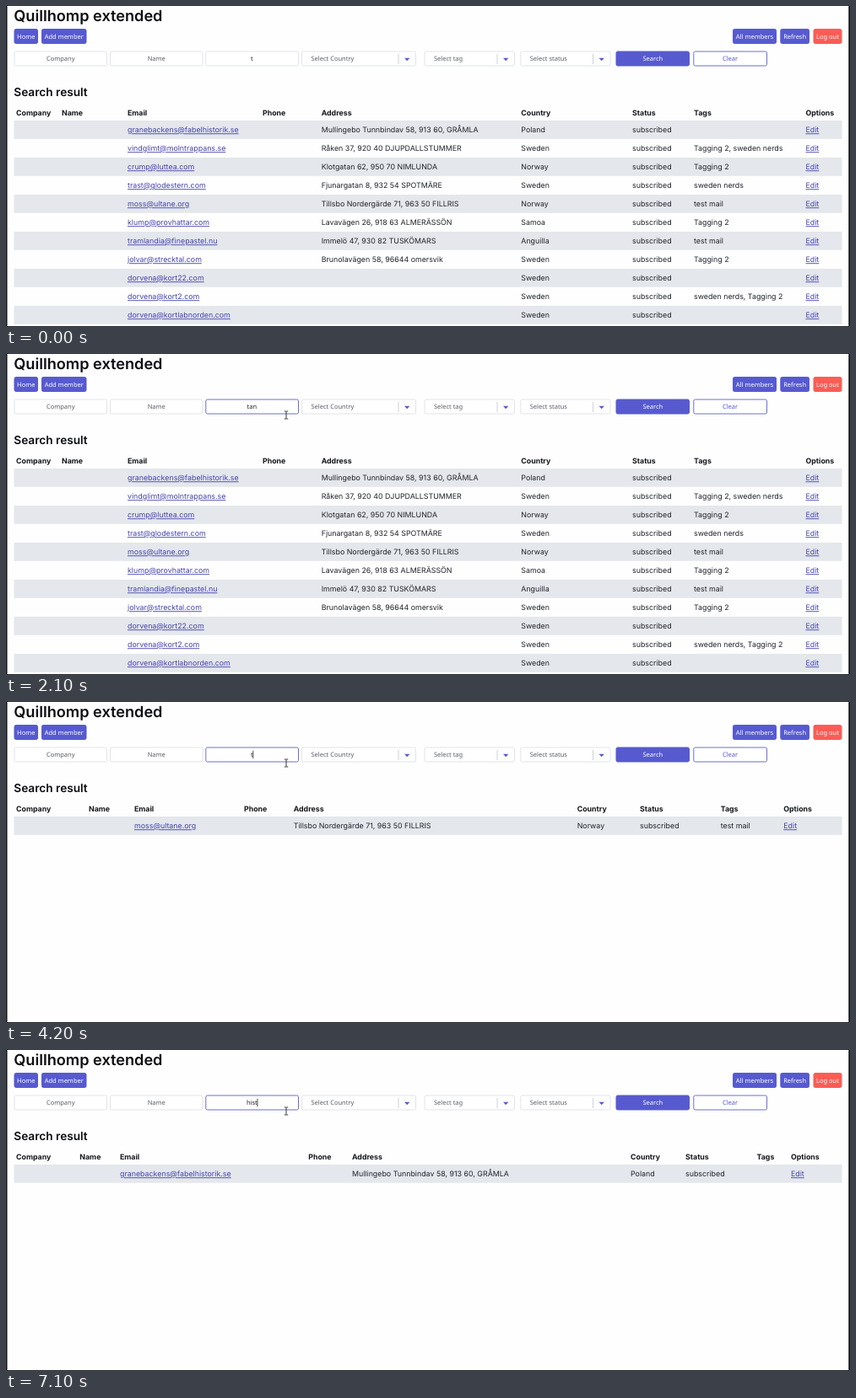
An HTML page that plays this animation: 1000 px wide and 380 px high, repeating every 7.2 s.

```html
<!DOCTYPE html>
<html lang="en">
<head>
<meta charset="utf-8">
<title>Member search</title>
<style>
  html, body { margin: 0; width: 100%; height: 100%; overflow: hidden; background: #fefefe; }
  svg { display: block; width: 100vw; height: 100vh; }
  text { font: 8.85px Inter, sans-serif; fill: #20232a; white-space: pre; text-rendering: geometricPrecision; }
  .title { font-size: 18.15px; font-weight: 600; fill: #0c0d12; }
  .sub { font-size: 13.65px; font-weight: 600; fill: #0c0d12; }
  .head { font-size: 8.8px; font-weight: 700; fill: #15171c; }
  .link { fill: #4240ad; text-decoration: underline; }
  .ui { font: 7.5px "Noto Sans", "Open Sans", sans-serif; fill: #585e69; }
  .mid { text-anchor: middle; }
  .white { fill: #fff; }
  .indigo { fill: #5457cd; }
  .dark { fill: #22252b; }
</style>
</head>
<body>
<svg id="stage" viewBox="0 0 1000 380" preserveAspectRatio="none"></svg>
<script>
const LOOP = 7200;
const INDIGO = '#575acf', EDGE = '#6c6ed5', RED = '#fb5c55', LINE = '#e2e4e9';
const stage = document.getElementById('stage');

function add(parent, tag, attrs, content) {
  const el = document.createElementNS('http://www.w3.org/2000/svg', tag);
  for (const key in attrs) el.setAttribute(key, attrs[key]);
  if (content !== undefined) el.textContent = content;
  parent.appendChild(el);
  return el;
}
const group = () => add(stage, 'g', {});
const label = (parent, x, y, str, cls = '') => add(parent, 'text', { x, y, class: cls }, str);
const show = (el, on) => el.setAttribute('visibility', on ? 'visible' : 'hidden');

function box(parent, x1, x2, y, fill, stroke) {
  return add(parent, 'rect', {
    x: x1 + 0.5, y: y + 0.5, width: x2 - x1 - 1, height: 17,
    rx: 1.8, fill, stroke, 'stroke-width': 1
  });
}
function button(parent, x1, x2, y, str, color = INDIGO) {
  box(parent, x1, x2, y, color, color);
  label(parent, (x1 + x2) / 2, y + 11.8, str, 'ui mid white');
}
function field(x1, x2, str) {
  const frame = box(stage, x1, x2, 53.5, '#fff', LINE);
  if (str) label(stage, (x1 + x2) / 2, 65.3, str, 'ui mid');
  return frame;
}
function select(x1, x2, str) {
  field(x1, x2);
  label(stage, x1 + 11.4, 65.3, str, 'ui');
  add(stage, 'rect', { x: x2 - 21.5, y: 57, width: 1, height: 12, fill: '#cfd2da' });
  add(stage, 'path', { d: `M${x2 - 14} 61.8h6.4l-3.2 3.5z`, fill: INDIGO });
}

// Page frame and controls
add(stage, 'rect', { width: 1000, height: 380, fill: '#fefefe' });
add(stage, 'rect', { width: 1.5, height: 380, fill: '#141418' });
add(stage, 'rect', { x: 998.3, width: 1.7, height: 380, fill: '#141418' });
label(stage, 9.3, 18, 'Quillhomp extended', 'title');
label(stage, 9.3, 107, 'Search result', 'sub');
button(stage, 9.5, 38, 27, 'Home');
button(stage, 42, 95.5, 27, 'Add member');
button(stage, 861, 913, 27, 'All members');
button(stage, 917.3, 952, 27, 'Refresh');
button(stage, 956.5, 990.5, 27, 'Log out', RED);
field(9.5, 120, 'Company');
field(123, 233.5, 'Name');
const input = field(236.3, 347);
select(350, 486, 'Select Country');
select(495.5, 603, 'Select tag');
select(609.3, 716.5, 'Select status');
button(stage, 722.5, 810, 53.5, 'Search');
const clear = group();
box(clear, 814.3, 902, 53.5, '#fff', EDGE);
label(clear, 858, 65.3, 'Clear', 'ui mid indigo');

// Email, address, country, tags
const people = [
  ['granebackens@fabelhistorik.se', 'Mullingebo Tunnbindav 58, 913 60, GRÅMLA', 'Poland', ''],
  ['vindglimt@molntrappans.se', 'Råken 37, 920 40 DJUPDALLSTUMMER', 'Sweden', 'Tagging 2, sweden nerds'],
  ['crump@luttea.com', 'Klotgatan 62, 950 70 NIMLUNDA', 'Norway', 'Tagging 2'],
  ['trast@glodestern.com', 'Fjunargatan 8, 932 54 SPOTMÄRE', 'Sweden', 'sweden nerds'],
  ['moss@ultane.org', 'Tillsbo Nordergärde 71, 963 50 FILLRIS', 'Norway', 'test mail'],
  ['klump@provhattar.com', 'Lavavägen 26, 918 63 ALMERÄSSÖN', 'Samoa', 'Tagging 2'],
  ['tramlandia@finepastel.nu', 'Immelö 47, 930 82 TUSKÖMARS', 'Anguilla', 'test mail'],
  ['jolvar@strecktal.com', 'Brunolavägen 58, 96644 omersvik', 'Sweden', 'Tagging 2'],
  ['dorvena@kort22.com', '', 'Sweden', ''],
  ['dorvena@kort2.com', '', 'Sweden', 'sweden nerds, Tagging 2'],
  ['dorvena@kortlabnorden.com', '', 'Sweden', '']
];
const heads = ['Company', 'Name', 'Email', 'Phone', 'Address', 'Country', 'Status', 'Tags', 'Options'];

function table(cols, rows) {
  const g = group();
  heads.forEach((h, i) => label(g, cols[i], 129.5, h, 'head'));
  rows.forEach(([email, address, country, tags], i) => {
    const top = 136 + i * 22, y = top + 14.3;
    if (i % 2 === 0) add(g, 'rect', { x: 9.5, y: top, width: 981, height: 21.8, fill: '#e4e7eb' });
    label(g, cols[2], y, email, 'link');
    label(g, cols[4], y, address);
    label(g, cols[5], y, country);
    label(g, cols[6], y, 'subscribed');
    label(g, cols[7], y, tags);
    label(g, cols[8], y, 'Edit', 'link');
  });
  return g;
}
const tables = {
  all: table([12, 66, 144, 304, 373.7, 610.3, 742, 815, 947.5], people),
  tan: table([12, 98, 152, 282, 340.7, 676.7, 751, 846.7, 921.3], [people[4]]),
  hist: table([12, 87.3, 135, 358.3, 410, 740, 805, 889.5, 930], [people[0]])
};

const typed = label(stage, 291.4, 65.3, '', 'ui mid');
const caret = add(stage, 'rect', { y: 57.8, width: 0.8, height: 9.4, fill: '#222' });
const arrow = add(stage, 'path', {
  d: 'M0 0V10.5L2.5 8.3L4.1 12L5.7 11.3L4.1 7.7H7.4Z', fill: '#fff', stroke: '#111', 'stroke-width': 0.8
});
const beam = add(stage, 'path', {
  d: 'M-2.2 -4.5H-.7L0 -4L.7 -4.5H2.2M0 -4V4M-2.2 4.5H-.7L0 4L.7 4.5H2.2',
  fill: 'none', stroke: '#222', 'stroke-width': 0.9
});

// [start time, value]
const keys = [[0, 't'], [1500, 'ta'], [1600, 'tan'], [4000, 'ta'], [4200, 't'], [4300, ''],
  [5100, 'h'], [5500, 'hi'], [5600, 'his'], [5700, 'hist']];
const results = [[0, 'all'], [2400, 'tan'], [4500, 'all'], [5900, 'hist']];
const FOCUS = 900, BLINK = 500;
const at = (steps, t) => steps.filter(s => s[0] <= t).pop();

function drawMouse(t) {
  const p = Math.min(1, Math.max(0, (t - 200) / 650));
  const e = p * p * (3 - 2 * p);
  const x = 1000 - 668 * e, y = 4 + 68.5 * e;
  const overText = x < 347;
  show(arrow, t >= 200 && !overText);
  show(beam, overText);
  (overText ? beam : arrow).setAttribute('transform', `translate(${x} ${y})`);
}

function draw(t) {
  const [keyTime, value] = at(keys, t);
  const result = at(results, t)[1];
  const focused = t >= FOCUS;
  for (const name in tables) show(tables[name], name === result);
  show(clear, t < 4500 || t >= 5900);
  input.setAttribute('stroke', focused ? EDGE : LINE);

  typed.textContent = value || 'Email';
  typed.setAttribute('class', value ? 'ui mid dark' : 'ui mid');
  const width = value ? typed.getComputedTextLength() : 0;
  caret.setAttribute('x', 291.1 + width / 2);
  const since = t - Math.max(FOCUS, keyTime);
  show(caret, focused && Math.floor(since / BLINK) % 2 === 0);
  drawMouse(t);
}

const start = performance.now();
function tick() {
  draw((performance.now() - start) % LOOP);
  requestAnimationFrame(tick);
}
tick();
</script>
</body>
</html>
```
